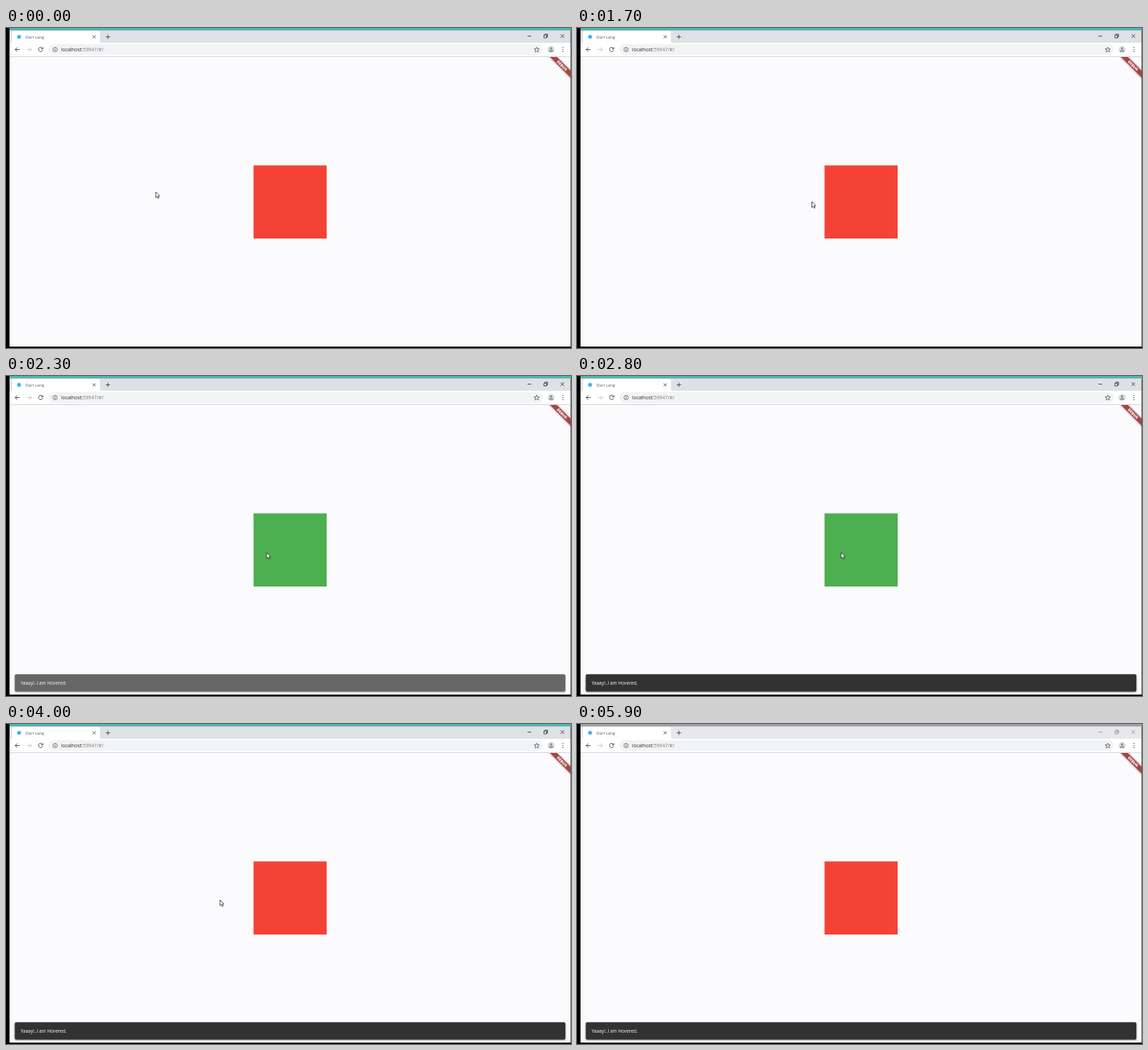
Write an HTML page that moves like this. It is 800x453 px and loops after 6000 ms.

```html
<!DOCTYPE html>
<html lang="en">
<head>
<meta charset="utf-8">
<title>Hover demo</title>
<style>
  html, body { margin: 0; width: 100%; height: 100%; overflow: hidden; background: #000; }
  svg { display: block; width: 800px; height: 453px; font-family: "Open Sans", "Noto Sans", sans-serif; }
  .icon { fill: none; stroke: #4a4d51; stroke-width: 1; }
</style>
</head>
<body>
<svg viewBox="0 0 800 453">
  <defs>
    <clipPath id="page"><rect x="5" y="41" width="794.5" height="410"/></clipPath>
    <filter id="soft" x="-10%" y="-60%" width="120%" height="220%"><feGaussianBlur stdDeviation="1.6"/></filter>
  </defs>

  <!-- Browser window -->
  <rect id="accent" x="5" width="795" height="4"/>
  <rect id="strip" x="5" y="3.5" width="794.5" height="18"/>
  <path d="M5 21.500Q8.500 21.500 8.500 18V7Q8.500 4 11.500 4H130Q133 4 133 7V18Q133 21.500 136.500 21.500Z" fill="#fff"/>
  <rect x="5" y="21" width="794.5" height="19.500" fill="#fff"/>
  <rect x="60" y="23" width="700" height="15" rx="7.500" fill="#f1f3f4"/>
  <circle cx="18.500" cy="12.500" r="2.800" fill="#42b4ee"/>
  <text x="27.500" y="14.600" font-size="5.850" fill="#55585c">Dart Lang</text>
  <text x="78" y="33" font-size="6.900" fill="#25282b">localhost:<tspan fill="#777a7e">59947/#/</tspan></text>

  <g class="icon">
    <path d="M122.800 10.500l4 4m0-4l-4 4M141.300 12.500h6m-3-3v6"/>
    <path d="M19.500 30.500h-6.500m3-3l-3 3 3 3"/>
    <path d="M29.500 30.500h6.500m-3-3l3 3-3 3" stroke="#c4c6c9"/>
    <path d="M51.600 28.700A3 3 0 1 0 52 31.200M52.200 27.200v2.300h-2.500"/>
    <circle cx="69.500" cy="30.500" r="3" stroke-width=".8"/>
    <path d="M69.500 30v2.200m0-3.700v.8" stroke-width=".8"/>
    <path d="M751.500 27l1 2.500 2.700.2-2.100 1.700.7 2.600-2.300-1.400-2.300 1.400.7-2.600-2.100-1.700 2.700-.2z" stroke-width=".8"/>
  </g>
  <circle cx="771.800" cy="30.500" r="5" fill="#dadce0"/>
  <circle cx="771.800" cy="28.900" r="1.600" fill="#85888c"/>
  <path d="M768.600 33.500q0-2.300 3.200-2.300t3.200 2.300z" fill="#85888c"/>
  <path d="M788.500 27.400h.01m0 3h.01m0 3h.01" stroke="#4a4d51" stroke-width="1.500" stroke-linecap="round"/>
  <path id="caption" d="M738.500 11.500h5M761.700 10.200h3.800v3.800h-3.800zM763 10v-1.300h3.800v3.800h-1.300M785.300 9l5 5m0-5l-5 5" fill="none" stroke-width=".9"/>

  <!-- Page -->
  <rect x="5" y="40" width="794.5" height="1" fill="#d5d6d8"/>
  <g clip-path="url(#page)">
    <rect x="5" y="41" width="795" height="410" fill="#fbfafc"/>
    <rect id="box" x="350.500" y="194.500" width="103.500" height="103.500"/>
    <g transform="translate(799.5 41) rotate(45)">
      <rect x="-24" y="14" width="48" height="6.600" fill="#000" opacity=".55" filter="url(#soft)"/>
      <rect x="-24" y="14" width="48" height="6.600" fill="#a94543"/>
      <text y="19.200" font-size="5.300" font-weight="800" fill="#fff" text-anchor="middle">DEBUG</text>
    </g>
    <g id="snack">
      <rect x="12.500" y="423.500" width="779.500" height="24" rx="2" fill="#000" opacity=".5" filter="url(#soft)"/>
      <rect x="12.500" y="422.300" width="779.500" height="24.500" rx="2" fill="#323232"/>
      <text x="20.800" y="437" font-size="6.500" fill="#fff">Yaaay!..I am Hovered.</text>
    </g>
  </g>

  <g id="pointer">
    <path id="arrow" d="M0 0V8.200L1.900 6.500 3.200 9.300 4.500 8.700 3.300 6H5.600Z" fill="#fff" stroke="#222" stroke-width=".8"/>
    <path id="beam" d="M-1.500-3.500H1.500M0-3.500V3.500M-1.500 3.500H1.500" fill="none" stroke="#222" stroke-width=".9"/>
  </g>
</svg>
<script>
const $ = id => document.getElementById(id);
const set = (id, name, value) => $(id).setAttribute(name, value);

const LOOP = 6000, TICK = 100;
const ENTER = 2200, LEAVE = 3600, BLUR = 5900;

// Pointer path: time, x, y
const path = [
  [0, 212, 232], [700, 265, 237], [1000, 309, 242], [2100, 346, 248],
  [2200, 368, 250], [2800, 374, 250], [3500, 352, 250], [4000, 303, 249],
  [4300, 312, 225], [4800, 372, 70], [5200, 389, 33], [5400, 389, 33],
  [5700, 405, -15], [6000, 405, -15]
];

function pointerAt(t) {
  const i = path.findIndex(p => p[0] > t);
  const [a, b] = [path[i - 1], path[i]];
  const k = (t - a[0]) / (b[0] - a[0]);
  return [1, 2].map(j => a[j] + (b[j] - a[j]) * k);
}

function draw(now) {
  const t = Math.floor(now % LOOP / TICK) * TICK;
  const [x, y] = pointerAt(t);
  const overAddress = y > 23 && y < 38;
  const active = t < BLUR;

  set("pointer", "transform", `translate(${x} ${y})`);
  set("arrow", "opacity", overAddress ? 0 : 1);
  set("beam", "opacity", overAddress ? 1 : 0);
  set("box", "fill", t >= ENTER && t < LEAVE ? "#4caf50" : "#f44336");
  set("snack", "opacity", Math.max(0, Math.min(1, t < ENTER ? 0 : 0.07 + (t - ENTER) / 150)));
  set("accent", "fill", active ? "#52b5b1" : "#a09fa1");
  set("strip", "fill", active ? "#dee1e6" : "#e6e8ec");
  set("caption", "stroke", active ? "#333" : "#909295");
  requestAnimationFrame(draw);
}
requestAnimationFrame(draw);
</script>
</body>
</html>
```
